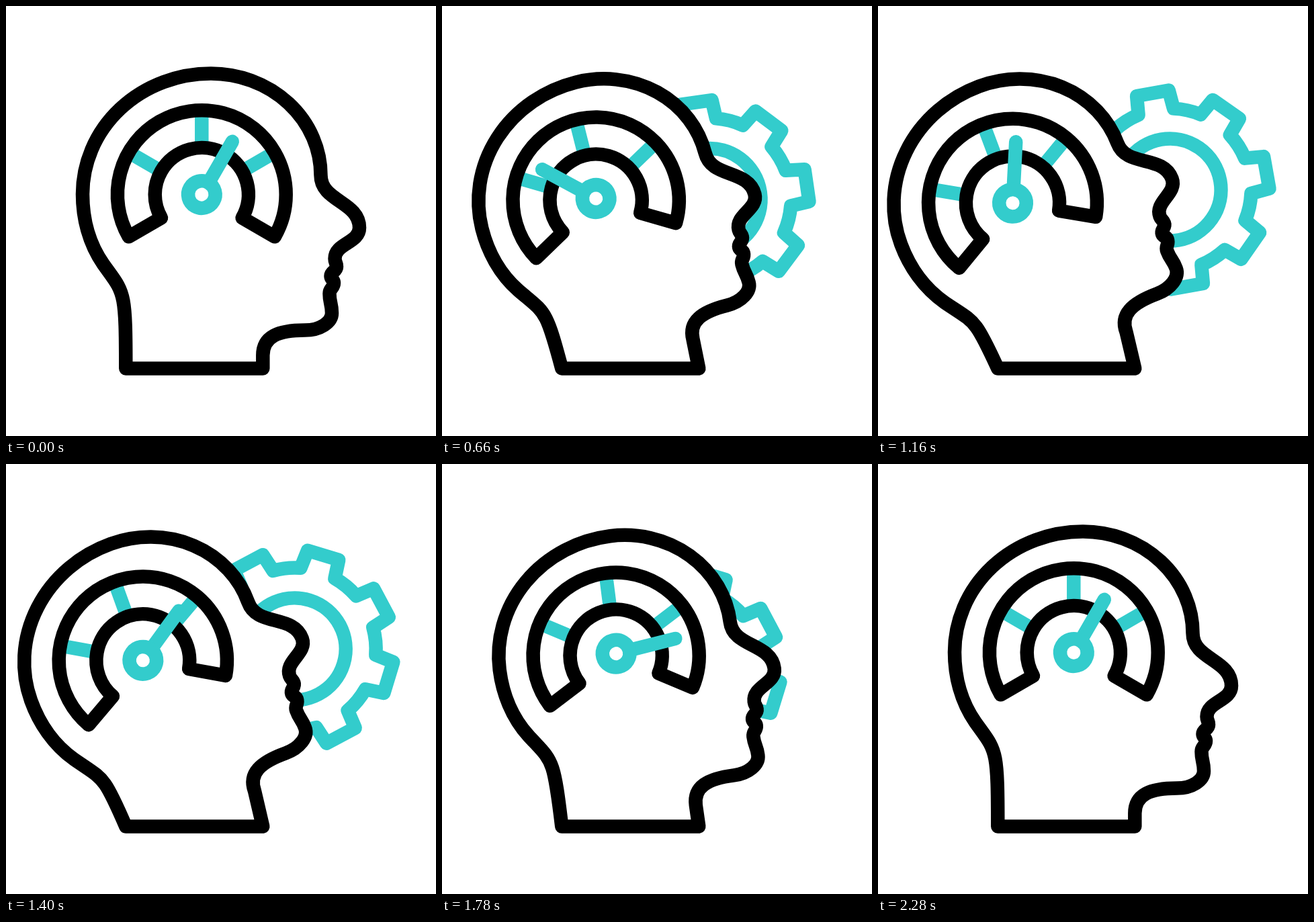
These frames come from a looping animation (640x640 px, 2.4 s). An HTML page with a canvas:

```html
<!DOCTYPE html>
<html lang="en">
<head>
<meta charset="utf-8">
<title>Mind gauge</title>
<style>
html, body { margin: 0; width: 100%; height: 100%; overflow: hidden; background: #fff; }
canvas { display: block; }
</style>
</head>
<body>
<canvas id="stage" width="640" height="640"></canvas>
<script>
const ctx = document.getElementById('stage').getContext('2d');
const LOOP = 2400, RAD = Math.PI / 180;
const BLACK = '#000', TEAL = '#33cccc', WHITE = '#fff';
const LINE = 20.5, TILT = 20.5 * RAD;
const PIVOT = { x: 280.5, y: 538 };
const DIAL = { x: 291.3, y: 280.6, outer: 125.4, inner: 69.6 };
const BASE = { left: 178.3, right: 382.3, y: 539.5 };

// Forehead, nose tip, lips and chin: the points where the face runs vertically.
const FACE = [
  [468.5, 252], [526, 330], [489.5, 376], [492, 388],
  [483.5, 402], [488, 412], [481.5, 428], [485, 457]
];

const mix = (a, b, p) => a + (b - a) * p;
const smooth = x => x * x * (3 - 2 * x);
const span = (t, from, to) => Math.min(1, Math.max(0, (t - from) / (to - from)));

// Symmetric cubic Bezier ease with handles (0.7, 0) and (0.3, 1).
function swingEase(x) {
  let lo = 0, hi = 1;
  for (let i = 0; i < 24; i++) {
    const s = (lo + hi) / 2, r = 1 - s;
    if (2.1 * s * r * r + 0.9 * s * s * r + s * s * s < x) lo = s;
    else hi = s;
  }
  return smooth((lo + hi) / 2);
}

function outAndBack(t, returnStart) {
  return swingEase(span(t, 44, 1144)) - swingEase(span(t, returnStart, returnStart + 1100));
}

// Needle angle in degrees, clockwise from upright.
function needleAngle(t) {
  if (t < 230) return mix(30, -86, smooth(span(t, 0, 230)));
  if (t < 2050) return mix(-86, 86, smooth(span(t, 230, 2050)));
  return mix(86, 30, smooth(span(t, 2050, 2280)));
}

function stroke(color) {
  ctx.strokeStyle = color;
  ctx.stroke();
}

function circle(radius) {
  ctx.beginPath();
  ctx.arc(0, 0, radius, 0, 2 * Math.PI);
}

function lineAt(degrees, radius) {
  ctx.lineTo(radius * Math.cos(degrees * RAD), radius * Math.sin(degrees * RAD));
}

// Adds path points blended straight from the upright to the tilted pose.
function posed(p, addPath) {
  const c = mix(1, Math.cos(TILT), p), s = p * Math.sin(TILT);
  ctx.save();
  ctx.translate(PIVOT.x, PIVOT.y);
  ctx.transform(c, -s, s, c, 0, 0);
  ctx.translate(-PIVOT.x, -PIVOT.y);
  addPath();
  ctx.restore();
}

function drawGear(p) {
  const teeth = 8, pitch = 360 / teeth, root = 121, tip = 148, rootHalf = 12.7, tipHalf = 9.4;
  ctx.save();
  ctx.translate(mix(320.5, 434.5, p), mix(319.5, 273.5, p));
  ctx.rotate((-10.1 - 422 * (1 - p)) * RAD);
  ctx.beginPath();
  for (let i = 0; i < teeth; i++) {
    const mid = i * pitch - 90;
    lineAt(mid - rootHalf, root);
    lineAt(mid - tipHalf, tip);
    lineAt(mid + tipHalf, tip);
    ctx.arc(0, 0, root, (mid + rootHalf) * RAD, (mid + pitch - rootHalf) * RAD);
  }
  ctx.closePath();
  stroke(TEAL);
  circle(76);
  stroke(TEAL);
  ctx.restore();
}

function addProfile() {
  // Nape and skull
  ctx.bezierCurveTo(178.3, 420, 176, 428, 145, 384.5);
  ctx.bezierCurveTo(123, 353, 114, 315, 114, 280);
  ctx.ellipse(305, 280, 191, 179.5, 0, Math.PI, 1.5 * Math.PI);
  ctx.ellipse(305, 252, 163.5, 151.5, 0, -0.5 * Math.PI, 0);
  // Face: S-curves between the vertical points
  for (let i = 1; i < FACE.length; i++) {
    const [x0, y0] = FACE[i - 1], [x, y] = FACE[i];
    const middle = (y0 + y) / 2;
    ctx.bezierCurveTo(x0, middle, x, middle, x, y);
  }
  // Jaw and throat
  ctx.ellipse(445, 457, 40, 25.5, 0, 0, 0.5 * Math.PI);
  ctx.bezierCurveTo(405, 482.5, BASE.right, 492, BASE.right, 520);
}

function drawHead(p) {
  ctx.beginPath();
  ctx.moveTo(BASE.left, BASE.y);
  posed(p, addProfile);
  ctx.lineTo(BASE.right, BASE.y);
  ctx.closePath();
  ctx.fillStyle = WHITE;
  ctx.fill();
  stroke(BLACK);
}

function drawDial(p) {
  ctx.beginPath();
  posed(p, () => {
    ctx.translate(DIAL.x, DIAL.y);
    for (let angle = -150; angle < 0; angle += 60) {
      ctx.moveTo(0, 0);
      ctx.rotate(angle * RAD);
      ctx.moveTo(DIAL.inner, 0);
      ctx.lineTo(DIAL.outer, 0);
      ctx.rotate(-angle * RAD);
    }
  });
  stroke(TEAL);

  ctx.beginPath();
  posed(p, () => {
    ctx.translate(DIAL.x, DIAL.y);
    ctx.arc(0, 0, DIAL.outer, 150 * RAD, 390 * RAD);
    ctx.arc(0, 0, DIAL.inner, 390 * RAD, 150 * RAD, true);
    ctx.closePath();
  });
  stroke(BLACK);
}

function drawNeedle(p, angle) {
  ctx.save();
  ctx.translate(DIAL.x - 90.8 * p, DIAL.y + 12.6 * p * p);
  ctx.rotate(angle * RAD);
  ctx.lineCap = 'round';
  ctx.beginPath();
  ctx.moveTo(0, -20);
  ctx.lineTo(0, -91);
  stroke(TEAL);
  circle(20.3);
  ctx.fillStyle = WHITE;
  ctx.fill();
  stroke(TEAL);
  ctx.restore();
}

function draw(now) {
  const t = now % LOOP;
  const lean = outAndBack(t, 1180);
  ctx.fillStyle = WHITE;
  ctx.fillRect(0, 0, 640, 640);
  ctx.lineWidth = LINE;
  ctx.lineJoin = 'round';
  drawGear(outAndBack(t, 1165));
  drawHead(lean);
  drawDial(lean);
  drawNeedle(lean, needleAngle(t));
}

const start = performance.now();
function tick() {
  draw(performance.now() - start);
  requestAnimationFrame(tick);
}
tick();
</script>
</body>
</html>
```
